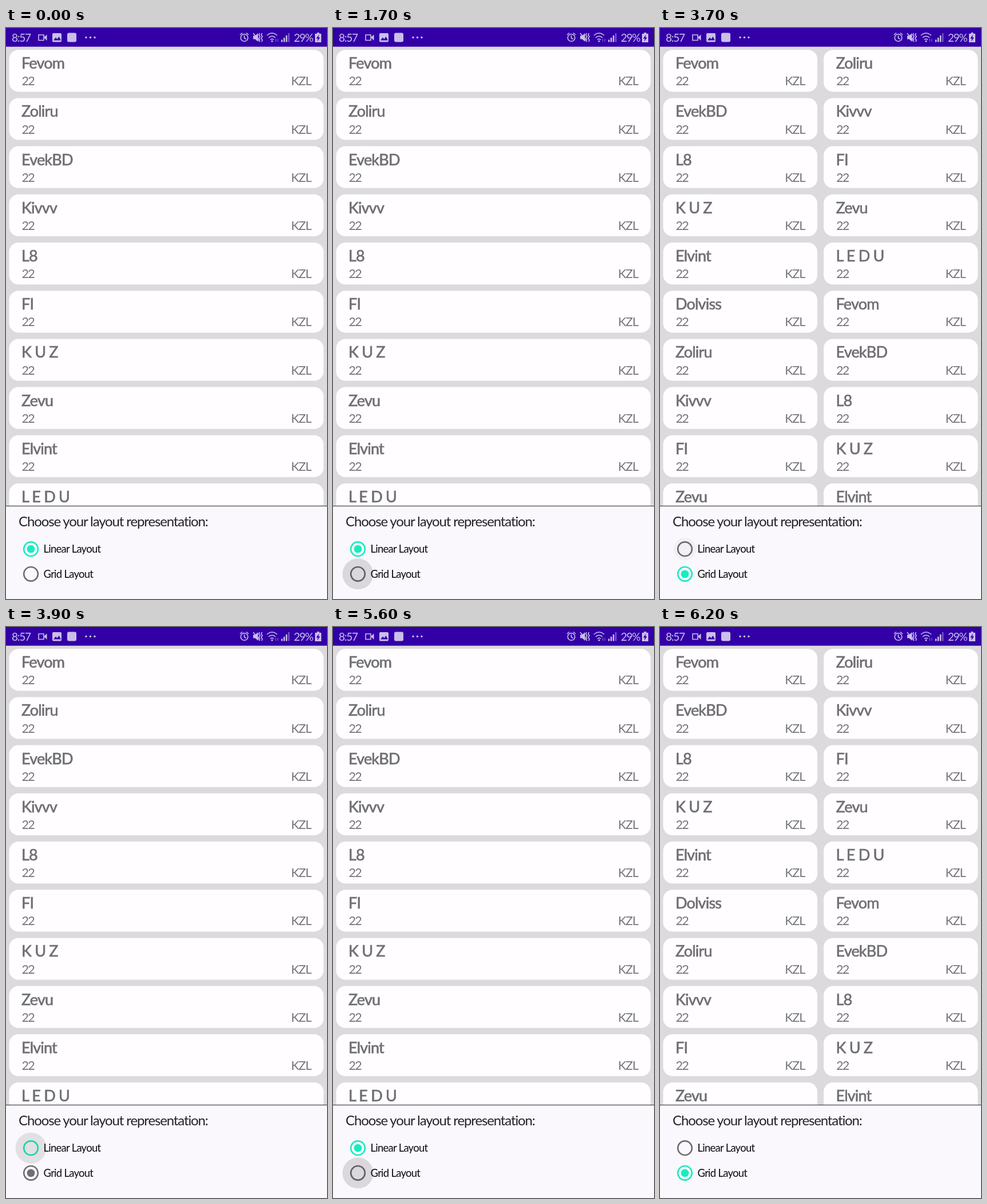
Recreate the animation shown at these times as an HTML page. Size 561 by 998 pixels, loop 6.3 s.

```html
<!DOCTYPE html>
<html lang="en">
<head>
<meta charset="utf-8">
<title>Layout picker</title>
<style>
  html, body { margin: 0; width: 100%; height: 100%; overflow: hidden; background: #dcdadd; }
  svg { display: block; width: 561px; height: 998px; font-family: Lato, "Open Sans", sans-serif; }
  .card { fill: #fffdff; }
  .name { font-size: 27px; letter-spacing: -.03em; fill: #706f72; stroke: #706f72; stroke-width: .7; }
  .info { font-size: 21.5px; letter-spacing: -.085em; fill: #757477; }
  .team { text-anchor: end; letter-spacing: -.055em; }
  .title { font-size: 24px; letter-spacing: -.047em; fill: #242327; }
  .label { font-size: 18.5px; letter-spacing: -.04em; fill: #0c0b0e; }
  .status { fill: #cbbfe9; stroke: #cbbfe9; stroke-width: 0; font-size: 19px; letter-spacing: -.065em; }
  .line { fill: none; stroke-width: 1.6; }
  .cut { fill: #3300a8; }
</style>
</head>
<body>
<svg viewBox="0 0 561 998">
  <rect width="561" height="998" fill="#dcdadd"/>
  <g id="linear"></g>
  <g id="grid"></g>

  <rect y="835" width="561" height="163" fill="#faf8fc"/>
  <rect y="834.800" width="561" height="1.400" fill="#58565b"/>
  <text class="title" x="22" y="871">Choose your layout representation:</text>
  <g id="radios"></g>
  <text class="label" x="65.500" y="917">Linear Layout</text>
  <text class="label" x="65.500" y="960.500">Grid Layout</text>

  <rect width="561" height="32.700" fill="#3300a8"/>
  <g class="status">
    <text x="10" y="23.500">8:57</text>
    <path class="line" d="M57 12h9v9.500h-9z"/>
    <path d="M66 16.500l5.500-5v10.500z"/>
    <rect x="81" y="9" width="16" height="15.500" rx="2"/>
    <path class="cut" d="M83 21.500l4-5 2.500 3 3-4.500 3.500 6.500z"/>
    <rect x="107" y="8.500" width="16" height="16" rx="3"/>
    <circle cx="140" cy="16.500" r="1.700"/><circle cx="147.500" cy="16.500" r="1.700"/><circle cx="155" cy="16.500" r="1.700"/>

    <circle class="line" cx="416.500" cy="17" r="6.300"/>
    <path class="line" d="M409 12l4-3.500M424 12l-4-3.500M416.500 13v4.500l3 2"/>
    <path d="M432 13.500h3.500l5-4.500v15l-5-4.500H432z"/>
    <path class="line" d="M432 9l12 15M443.500 9l-1.500 3 2 3-2 3 2 3M447.500 9l-1.500 3 2 3-2 3 2 3-1 3"/>
    <path class="line" d="M456 13q9-8 18 0M459 17q6-5.500 12 0M462 20.500q3-2.500 6 0"/>
    <circle cx="465" cy="23" r="1.600"/>
    <path d="M471 19h1v5h-1zM474.500 19h1v5h-1z" opacity=".6"/>
    <path d="M481 20.500h2.500v4H481zM485 17h2.500v7.500H485zM489 13h2.500v11.500H489z"/>
    <path d="M493 9h2.500v15.500H493z" opacity=".45"/>
    <text x="503" y="23.500">29%</text>
    <path d="M543.500 8h4v2h3.500v15H540V10h3.500z"/>
    <path class="cut" d="M547 11.500l-5 7h3l-1 5 5-7h-3z"/>
  </g>
</svg>
<script>
const LOOP = 6300, STEP = 100;
const GREY = '#706e73', TEAL = '#19ecc0';
const names = ['Fevom', 'Zoliru', 'EvekBD', 'Kivvv', 'L8', 'FI', 'K U Z', 'Zevu', 'Elvint', 'L E D U', 'Dolviss'];

// Each tap: chosen option, ripple start and full size, release, settling start and end.
const taps = [
  { pick: 1, press: 1200, full: 1700, release: 2100, settle: 2100, end: 2300 },
  { pick: 0, press: 3600, full: 4000, release: 3900, settle: 3900, end: 4400 },
  { pick: 1, press: 5400, full: 5600, release: 5700, settle: 5900, end: 6200 }
];

const byId = id => document.getElementById(id);
const ramp = (t, from, to) => Math.min(1, Math.max(0, (t - from) / (to - from)));

function fillList(id, columns) {
  const width = columns === 1 ? 549.5 : 269.5;
  let cards = '';
  for (let i = 0; i < 10 * columns; i++) {
    const x = 5.5 + (i % columns) * 280.5;
    const y = 38.2 + Math.floor(i / columns) * 84.2;
    cards += `<g transform="translate(${x} ${y})">
      <rect class="card" width="${width}" height="73.2" rx="16.4"/>
      <text class="name" x="21.5" y="33">${names[i % names.length]}</text>
      <text class="info" x="22" y="62.3">22</text>
      <text class="info team" x="${width - 22}" y="62.3">KZL</text></g>`;
  }
  byId(id).innerHTML = cards;
}

fillList('linear', 1);
fillList('grid', 2);
byId('radios').innerHTML = [910.7, 954.3].map(y => `<g transform="translate(43.5 ${y})">
  <circle class="ring" r="12.3" fill="none" stroke-width="2.7"/>
  <circle class="dot"/><circle class="ripple" fill="#000"/></g>`).join('');

const radios = [...byId('radios').children].map(g => ({
  ring: g.querySelector('.ring'), dot: g.querySelector('.dot'), ripple: g.querySelector('.ripple')
}));

function draw(t) {
  const tap = taps.filter(p => t >= p.press).pop();
  const released = tap && t >= tap.release;
  const checked = tap ? (released ? tap.pick : 1 - tap.pick) : 0;
  const settled = released ? ramp(t, tap.settle, tap.end) : 1;
  const grow = tap ? ramp(t, tap.press, tap.full) : 0;
  const fade = released ? 1 - ramp(t, tap.settle, tap.end - 100) : 1;

  byId('linear').style.display = checked ? 'none' : '';
  byId('grid').style.display = checked ? '' : 'none';

  radios.forEach(({ ring, dot, ripple }, i) => {
    const on = i === checked;
    const color = on ? TEAL : GREY;
    ring.setAttribute('stroke', color);
    dot.setAttribute('fill', color);
    dot.setAttribute('r', 6.9 * (on ? settled : 1 - ramp(settled, 0, .6)));
    ripple.setAttribute('r', 27 * (.6 + .4 * Math.min(1, grow * 1.4)));
    ripple.setAttribute('opacity', tap && tap.pick === i ? .13 * grow * fade : 0);
  });
}

const start = performance.now();
function tick() {
  const t = (performance.now() - start) % LOOP;
  draw(Math.floor(t / STEP) * STEP);
  requestAnimationFrame(tick);
}
tick();
</script>
</body>
</html>
```
